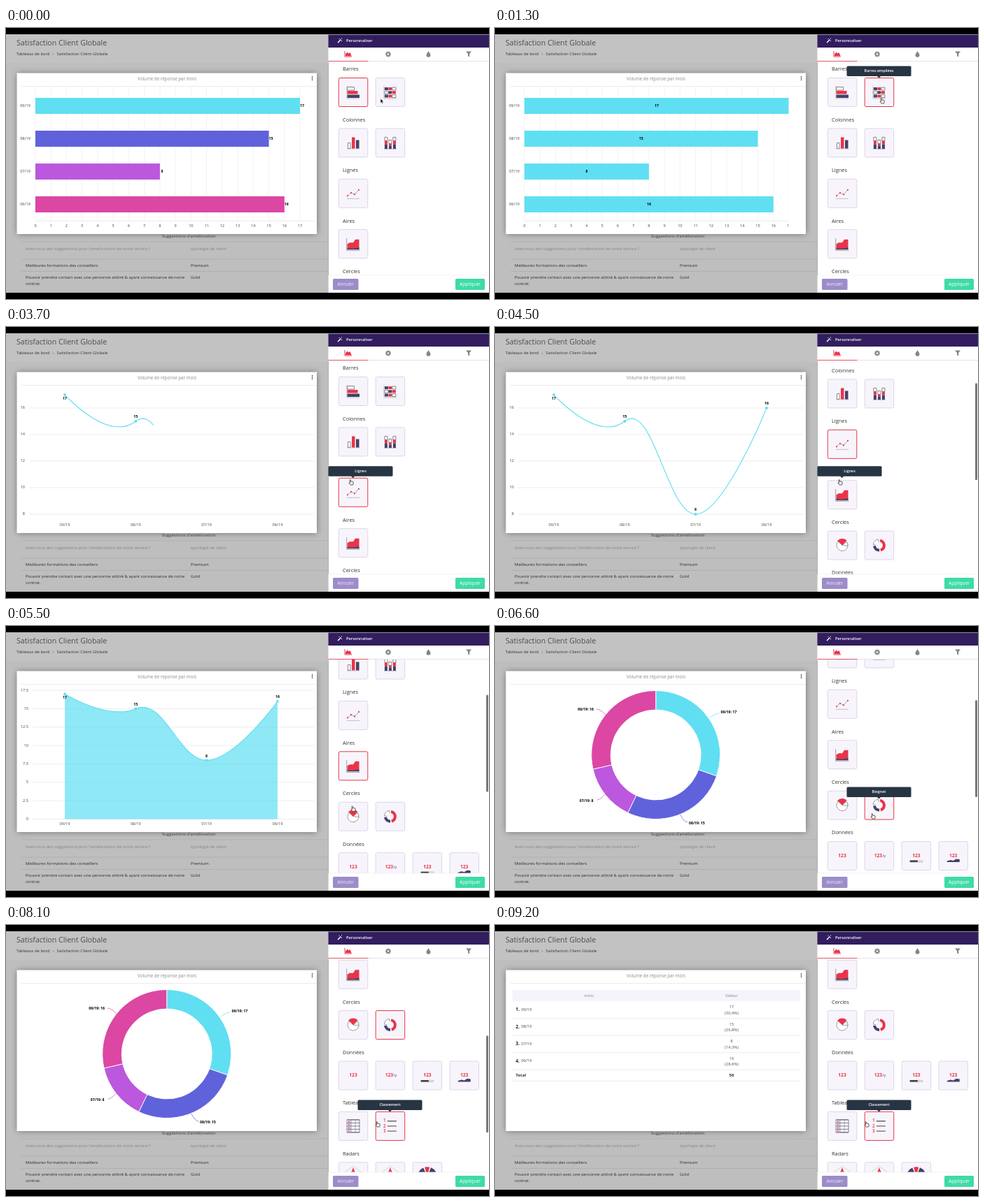
An HTML page with a canvas that plays this animation: 690 by 388 pixels, repeating every 9.3 s.

```html
<!DOCTYPE html>
<html lang="fr">
<head>
<meta charset="utf-8">
<title>Personnaliser</title>
<style>
  html, body { margin: 0; width: 100%; height: 100%; overflow: hidden; background: #000; }
  canvas { display: block; width: 690px; height: 388px; }
</style>
</head>
<body>
<canvas width="690" height="388"></canvas>
<script>
const ctx = document.querySelector('canvas').getContext('2d');
const LOOP = 9300, STEP = 100;
const CYAN = '#60dff2', BLUE = '#6062dc', PURPLE = '#bb58dd', PINK = '#db47a2';
const RED = '#ea3349', NAVY = '#45416a', GREY = '#858585', TILE = '#f7f5fb';
const COLORS = [CYAN, BLUE, PURPLE, PINK];
const MONTHS = ['09/19', '08/19', '07/19', '06/19'];
const VALUES = [17, 15, 8, 16];
const TOTAL = 56;

// Start time, chart type, selected tile (section, column)
const CHARTS = [
  [0, bars, 0, 0], [600, stacked, 0, 1], [2000, columns, 1, 0], [3600, line, 2, 0],
  [5100, area, 3, 0], [5700, pie, 4, 0], [6100, donut, 4, 1], [8400, ranking, 6, 1]
];
// Start, end, label, section, column
const HOVERS = [
  [200, 1700, 'Barres empilées', 0, 1], [1900, 3000, 'Colonne', 1, 0], [3200, 4700, 'Lignes', 2, 0],
  [4900, 5300, 'Aires', 3, 0], [5600, 5800, 'Camembert', 4, 0], [5900, 7100, 'Beignet', 4, 1],
  [7900, LOOP, 'Classement', 6, 1]
];
const SCROLL = [
  [0, 0], [4200, 0], [4450, 69], [5300, 69], [5550, 113.5], [6300, 113.5], [6500, 125],
  [7100, 125], [7600, 238.5]
];
const POINTER = [
  [0, 535, 101], [100, 535, 101], [400, 553, 104], [1500, 553, 104], [1900, 504, 160], [2700, 504, 160],
  [3300, 493, 222], [4700, 493, 222], [4950, 495, 238], [5300, 495, 238], [5550, 496, 264],
  [5750, 496, 264], [5950, 540, 272], [7500, 540, 272], [7900, 531, 285]
];
const SECTIONS = [
  ['Barres', iconBars, iconStackedBars], ['Colonnes', iconColumns, iconStackedColumns],
  ['Lignes', iconLine], ['Aires', iconArea], ['Cercles', iconPie, iconDonut],
  ['Données', iconNumber, iconRate, iconProgress, iconTrend],
  ['Tableaux', iconTable, iconRanking], ['Radars', iconRadar, iconRadar, iconGauge]
];

const ease = u => u * u * (3 - 2 * u);

function tween(keys, t) {
  const next = keys.findIndex(k => k[0] > t);
  if (next < 0) return keys[keys.length - 1].slice(1);
  const a = keys[next - 1], b = keys[next];
  const u = ease((t - a[0]) / (b[0] - a[0]));
  return a.slice(1).map((v, i) => v + (b[i + 1] - v) * u);
}

function rect(x, y, w, h, fill, stroke, radius = 0) {
  ctx.beginPath();
  ctx.roundRect(x, y, w, h, radius);
  paint(fill, stroke);
}

function paint(fill, stroke, width = 1) {
  if (fill) { ctx.fillStyle = fill; ctx.fill(); }
  if (stroke) { ctx.strokeStyle = stroke; ctx.lineWidth = width; ctx.stroke(); }
}

function poly(points, fill, stroke, width) {
  ctx.beginPath();
  for (let i = 0; i < points.length; i += 2) ctx.lineTo(points[i], points[i + 1]);
  if (fill) ctx.closePath();
  paint(fill, stroke, width);
}

function disc(x, y, r, fill, stroke, width) {
  ctx.beginPath();
  ctx.arc(x, y, r, 0, 7);
  paint(fill, stroke, width);
}

function text(s, x, y, size, color, align = 'left', weight = 400) {
  ctx.font = `${weight} ${size}px "Open Sans", sans-serif`;
  ctx.textAlign = align;
  ctx.textBaseline = 'middle';
  ctx.fillStyle = color;
  ctx.fillText(s, x, y);
}

const label = (s, x, y, align = 'center') => text(s, x, y, 5.6, '#444', align);
const valueLabel = (s, x, y, align = 'center') => text(s, x, y, 5.2, '#000', align, 700);

function clipped(x, y, w, h, draw) {
  ctx.save();
  ctx.beginPath();
  ctx.rect(x, y, w, h);
  ctx.clip();
  draw();
  ctx.restore();
}

// Charts: u is the progress of the entry animation

const UNIT = 378 / 17;

function horizontal(u, each) {
  for (let i = 0; i <= 17; i++) {
    const x = 42 + i * UNIT;
    poly([x, 84, x, 276], null, '#ececec', .7);
    label(i, x, 283.5);
  }
  poly([42, 276.5, 440, 276.5], null, '#e4e4e4', .7);
  VALUES.forEach((v, i) => {
    const y = 111.5 + 47 * i;
    label(MONTHS[i], 35, y, 'right');
    each(v, y, v * UNIT * u, i);
  });
}

function bars(u) {
  horizontal(u, (v, y, w, i) => {
    rect(42, y - 11.5, w, 23, COLORS[i]);
    valueLabel(v, 45 + w, y);
  });
}

function stacked(u) {
  clipped(16, 84, 403.5, 211, () => horizontal(u, (v, y, w) => {
    rect(42, y - 11.5, w, 23, CYAN);
    valueLabel(v, 42 + w / 2, y);
  }));
}

function rows(first, step, count, y0, dy, left) {
  for (let i = 0; i < count; i++) {
    const y = y0 - dy * i;
    poly([left + 6, y, 440, y], null, '#e6e6e6', .7);
    label(first + step * i, left, y, 'right');
  }
}

function columns(u) {
  rows(0, 2.5, 8, 276.5, 26.35, 32);
  VALUES.forEach((v, i) => {
    const x = 88.5 + 100.3 * i, h = v * 10.54 * u;
    clipped(16, 84, 380, 192.5, () => rect(x - 24, 276.5 - h, 48, h, COLORS[i]));
    valueLabel(v, x, 271 - h);
    label(MONTHS[i], x, 284);
  });
}

function spline(yOf, u, fill) {
  const x = i => 84 + 101.3 * i;
  const y = VALUES.map(yOf), slope = 1.8 * (yOf(0) - yOf(1));
  clipped(16, 84, 68 + 360 * u, 193, () => {
    ctx.beginPath();
    ctx.moveTo(x(0), y[0]);
    ctx.bezierCurveTo(x(0), y[0], x(.6), y[1] + slope * .9, x(1), y[1]);
    ctx.bezierCurveTo(x(1.4), y[1] - slope * .9, x(1.6), y[2], x(2), y[2]);
    ctx.bezierCurveTo(x(2.4), y[2], x(3), y[3], x(3), y[3]);
    paint(null, CYAN, 1.1);
    if (fill) {
      ctx.lineTo(x(3), 276.5);
      ctx.lineTo(x(0), 276.5);
      paint(fill);
    }
    VALUES.forEach((v, i) => disc(x(i), y[i], 1.9, CYAN));
  });
  VALUES.forEach((v, i) => {
    if (u > i / 4) valueLabel(v, x(i), y[i] + (i ? -6 : 5.5));
    label(MONTHS[i], x(i), 284);
  });
}

function line(u) {
  rows(8, 2, 5, 268, 38, 27);
  spline(v => 420 - 19 * v, u);
}

function area(u) {
  rows(0, 2.5, 8, 276.5, 26.35, 32);
  spline(v => 276.5 - 10.54 * v, u, 'rgba(96,223,242,.7)');
}

function ring(u, inner) {
  const cx = 229.7, cy = 184.5, R = 92;
  let from = -Math.PI / 2;
  VALUES.forEach((v, i) => {
    const to = from + v / TOTAL * Math.PI * 2 * u;
    ctx.beginPath();
    ctx.arc(cx, cy, R, from, to);
    ctx.arc(cx, cy, inner, to, from, true);
    ctx.closePath();
    paint(COLORS[i], '#fff', .9);
    from = to;
  });
  if (u < 1) return;
  const marks = [[307, 131, 320, 125, 322.5, 124], [264.5, 270, 275, 281, 277, 283],
    [157, 241, 146, 249, 140.5, 251], [158, 127, 145, 119, 141, 119.5]];
  marks.forEach(([x1, y1, x2, y2, x, y], i) => {
    ctx.beginPath();
    ctx.moveTo(x1, y1);
    ctx.quadraticCurveTo(x2 - (x2 - x1) * .4, y2, x2, y2);
    paint(null, COLORS[i], .7);
    valueLabel(`${MONTHS[i]}: ${VALUES[i]}`, x, y, i < 2 ? 'left' : 'right');
  });
}

function pie(u) { ring(u, 0); }
function donut(u) { ring(u, 64.5); }

function ranking() {
  rect(25, 93, 411, 16, '#f5f3fb');
  text('mois', 134, 101, 6, GREY, 'center');
  text('Valeur', 338, 101, 6, GREY, 'center');
  VALUES.forEach((v, i) => {
    const y = 121.5 + 24.5 * i;
    text(`${i + 1}.`, 29.5, y, 6.6, '#222', 'left', 700);
    label(MONTHS[i], 37.5, y, 'left');
    text(v, 338, y - 4, 5.9, '#555', 'center');
    text(`(${(v / TOTAL * 100).toFixed(1).replace('.', ',')}%)`, 338, y + 4.5, 5.9, '#555', 'center');
    poly([25, y + 12.2, 436, y + 12.2], null, '#e6e6e6', .7);
  });
  text('Total', 29.5, 215, 6, '#333', 'left', 700);
  text(TOTAL, 338, 215, 6, '#333', 'center', 700);
  poly([25, 223.5, 436, 223.5], null, '#e6e6e6', .7);
}

// Tile icons, drawn around the tile centre

const axes = () => poly([-9, -9, -9, 9, 9, 9], null, '#aaa', .7);

function iconBars() {
  axes();
  rect(-8.5, -7.5, 10, 4.5, '#fff', GREY);
  rect(-8.5, -2, 15, 4.5, RED);
  rect(-8.5, 3.5, 17.5, 4.5, NAVY);
}

function iconStackedBars() {
  axes();
  const cells = [[NAVY, RED, '#fff'], ['#fff', NAVY, RED], [NAVY, RED, '#fff']];
  cells.forEach((row, j) => row.forEach((c, i) =>
    rect(-8 + 5.5 * i, -7 + 5.3 * j, 5, 4, c, c === '#fff' && GREY)));
}

function iconColumns() {
  poly([-9, 8.5, 9, 8.5], null, '#aaa', .7);
  rect(-7.5, 0, 3.5, 8, '#fff', GREY);
  rect(-2, -8, 4.5, 16, RED);
  rect(4, -4, 4.5, 12, NAVY);
}

function iconStackedColumns() {
  poly([-9, 9, 9, 9], null, '#aaa', .7);
  [-8, -2, 4].forEach((x, i) => {
    rect(x, i === 1 ? -4 : -8, 4, 5, '#fff', GREY);
    rect(x, i === 1 ? 1 : -3, 4, i === 1 ? 3 : 5, RED);
    rect(x, i === 1 ? 4 : 2, 4, i === 1 ? 4.5 : 6.5, NAVY);
  });
}

function iconLine() {
  poly([-9, 7.5, 9, 7.5], null, '#aaa', .7);
  const points = [-8, 3.5, -3, -1, 2, 1.5, 8, -5];
  poly(points, null, GREY, .7);
  for (let i = 0; i < 8; i += 2) disc(points[i], points[i + 1], 1.1, RED);
}

function iconArea() {
  poly([-8.5, 7, -8.5, 0, -5, -2, 0, -2, 3, -6.5, 8.5, -6.5, 8.5, 7], RED);
  poly([-8.5, 8, -8.5, 6, 0, 6.5, 8.5, 5, 8.5, 8], NAVY);
  poly([-9.3, -8, -9.3, 9, 9.5, 9], null, GREY, .8);
}

function slice(r, from, to, color, stroke) {
  ctx.beginPath();
  ctx.moveTo(0, 0);
  ctx.arc(0, 0, r, from, to);
  ctx.closePath();
  paint(color, stroke, .8);
}

function iconPie() {
  slice(8, -.6, 4, '#fff', GREY);
  slice(9.5, -2.4, -.8, RED);
  slice(8, -.7, .1, '#fff', GREY);
}

function iconDonut() {
  slice(9, -1.4, 1.3, RED);
  slice(9, 1.55, 3, NAVY);
  slice(8.7, 3.25, 4.55, '#fff', GREY);
  disc(0, 0, 5, TILE);
}

const number = (s, y) => text(s, 0, y, 6.6, RED, 'center', 700);

function iconNumber() { number('123', 0); }

function iconRate() {
  text('123', -1.5, 0, 6.6, RED, 'center', 700);
  text('/y', 4.5, .5, 5.6, NAVY);
}

function iconProgress() {
  number('123', 0);
  rect(-9, 7, 18, 2, '#fff', '#bbb');
  rect(-9, 6.5, 11, 2.5, '#444');
}

function iconTrend() {
  number('123', 0);
  poly([-9, 9, -9, 7.5, -4, 6, 0, 7, 4, 4.5, 9, 5, 9, 9], NAVY);
}

function iconTable() {
  rect(-9, -9, 18, 18, '#fff', GREY);
  rect(-9, -9, 6, 18, '#ddd9e8');
  for (let y = -9; y <= 9; y += 4.5) poly([-9, y, 9, y], null, NAVY, .7);
  [-3, 3].forEach(x => poly([x, -9, x, 9], null, GREY, .7));
  for (let y = -6.7; y < 8; y += 4.5) rect(-7.5, y - .5, 2.5, 1, RED);
}

function iconRanking() {
  [1, 2, 3].forEach(n => {
    const y = (n - 2) * 7.2;
    text(n, -8, y, 6.4, RED, 'center', 600);
    poly([-4, y, 9, y], null, '#666', 1.4);
  });
}

function iconRadar() {
  poly([0, -15, 12, -6, 8, 9, -8, 9, -12, -6, 0, -15], null, '#bbb', .6);
  poly([0, -13, 6, 2, -6, 2], RED);
  poly([0, -8, 3, 0, -3, 0], TILE);
}

function iconGauge() {
  slice(14, 3, 4.3, NAVY);
  slice(14, 4.45, 4.95, RED);
  slice(14, 5.1, 6.4, NAVY);
  disc(0, 0, 6, TILE);
}

// Scene

const tileX = col => 475.3 + 52.9 * col;
const tileY = (section, scroll) => 71.5 + 72.4 * section - scroll;

function page() {
  rect(0, 0, 690, 388, '#000');
  rect(0, 9, 460.5, 370, '#bebebe');
  rect(0, 9, 460.5, 41, '#c2c2c2');
  text('Satisfaction Client Globale', 15, 22.5, 10.65, '#4d4d4d');
  text('Tableaux de bord', 15, 37.5, 5.9, '#333');
  text('›', 66.5, 37, 5.9, '#555');
  text('Satisfaction Client Globale', 72.5, 37.5, 6, '#333');
  const body = (s, x, y, color = '#2c2c2c') => text(s, x, y, 5.98, color);
  text("Suggestions d'amélioration", 261, 298, 6.1, '#444', 'center');
  body("Avez-vous des suggestions pour l'amélioration de notre service ?", 28, 316.5, '#858585');
  body('typologie de client', 264, 316.5, '#858585');
  body('Meilleures formations des conseillers', 28, 340);
  body('Premium', 264, 340);
  body('Pouvoir prendre contact avec une personne attitré & ayant connaissance de notre', 28, 357);
  body('contrat.', 28, 366.5);
  body('Gold', 264, 357);
  [306, 331, 348.5].forEach(y => poly([22, y, 460, y], null, '#adadad', .8));
}

function card(t) {
  ctx.save();
  ctx.shadowColor = 'rgba(0,0,0,.45)';
  ctx.shadowBlur = 9;
  rect(15.5, 64.5, 428.5, 230.5, '#fff');
  ctx.restore();
  text('Volume de réponse par mois', 230, 73.5, 6.25, '#8a8a8a', 'center');
  poly([22, 83.5, 444, 83.5], null, '#e8e8e8', .8);
  [69.8, 72, 74.2].forEach(y => disc(437.5, y, .75, '#222'));
  const [start, draw] = CHARTS.findLast(c => c[0] <= t);
  draw(start ? ease(Math.min(1, (t - start + STEP) / 500)) : 1);
}

function tiles(t, scroll) {
  const chart = CHARTS.findLast(c => c[0] <= t);
  const hover = HOVERS.find(h => t >= h[0] && t < h[1]);
  const matches = (entry, s, c) => entry && entry.at(-2) === s && entry.at(-1) === c;
  SECTIONS.forEach(([name, ...icons], s) => {
    const y = tileY(s, scroll);
    text(name, 481, y - 12, 7.4, '#333');
    icons.forEach((icon, c) => {
      const x = tileX(c);
      const active = matches(chart, s, c) || matches(hover, s, c);
      if (!active) ctx.setLineDash([1.5, 1]);
      rect(x, y, 41.5, 41, TILE, active ? RED : '#c5bddc', 2);
      ctx.setLineDash([]);
      ctx.save();
      ctx.translate(x + 20.7, y + 20.5);
      icon();
      ctx.restore();
    });
  });
}

function panel(t, scroll) {
  rect(460.5, 9, 229.5, 370, '#fff');
  clipped(460.5, 48, 229.5, 306, () => tiles(t, scroll));
  const scrolling = (t >= 4200 && t < 5000) || (t >= 5300 && t < 6900) || (t >= 7100 && t < 8500);
  if (scrolling) rect(686, 48.5 + scroll * .46, 3, 139, '#777', null, 1.5);

  rect(460.5, 9.5, 229.5, 18.5, '#321d5f');
  poly([474, 21, 478.5, 16.5], null, '#fff', 1.4);
  [[476, 15.5], [479.5, 15], [479.5, 18.5]].forEach(([x, y]) => rect(x - .5, y - .5, 1, 1, '#fff'));
  text('Personnaliser', 486, 18.3, 5.7, '#fff', 'left', 600);

  rect(460.5, 28, 229.5, 19.5, '#fff');
  poly([460.5, 47.5, 690, 47.5], null, '#dcdce4', .8);
  poly([460.5, 47.5, 517.5, 47.5], null, RED, .8);
  poly([484, 33, 484, 41, 494, 41], null, RED, 1);
  poly([485, 40, 485, 37.5, 487.5, 34.5, 489.5, 36.5, 491.5, 35, 493.5, 40], RED);
  for (let i = 0; i < 4; i++) {
    const a = i * Math.PI / 4, dx = Math.cos(a) * 4, dy = Math.sin(a) * 4;
    poly([546 - dx, 37.5 - dy, 546 + dx, 37.5 + dy], null, GREY, 1.7);
  }
  disc(546, 37.5, 2.1, '#fff', GREY, 1.6);
  ctx.beginPath();
  ctx.moveTo(603.5, 33);
  ctx.bezierCurveTo(605, 36, 606.5, 37, 606.5, 38.7);
  ctx.arc(603.5, 38.7, 3, 0, Math.PI);
  ctx.bezierCurveTo(600.5, 37, 602, 36, 603.5, 33);
  paint(GREY);
  poly([657, 33.5, 665, 33.5, 662.2, 37, 662.2, 41.5, 660, 40, 660, 37], GREY);

  rect(460.5, 354, 229.5, 25, '#fff');
  poly([460.5, 354, 690, 354], null, '#ececf0', .7);
  rect(467, 359, 36.5, 16, '#9c8cc9', null, 1.5);
  text('Annuler', 485.2, 367, 6.4, '#f1edff', 'center');
  rect(642, 359, 42, 16, '#3edba6', null, 1.5);
  text('Appliquer', 663, 367, 6.6, '#fff', 'center');
}

function tooltip(t) {
  const hover = HOVERS.find(h => t >= h[0] && t < h[1]);
  if (!hover) return;
  // The tooltip keeps its place when the list scrolls under it
  const [start, , name, section, col] = hover;
  const y = tileY(section, tween(SCROLL, start)[0]) - 17;
  const center = tileX(col) + 20.3;
  const x = Math.max(460.5, center - 46);
  rect(x, y, 92, 14.5, '#273443', null, 1.5);
  poly([center - 3, y + 14, center + 3, y + 14, center, y + 17], '#273443');
  text(name, x + 46, y + 7.4, 5.4, '#fff', 'center', 600);
}

function pointer(t) {
  const [x, y] = tween(POINTER, t);
  ctx.save();
  ctx.translate(x, y);
  if (t < 200) {
    poly([0, 0, 0, 6.5, 1.5, 5.2, 2.6, 7.5, 3.6, 7, 2.6, 4.8, 4.6, 4.7], '#111', '#fff', .5);
  } else {
    poly([-2, -3, -1, -3.4, 0, -.6, 1, -1, 2, -.5, 3, -.2, 3.2, 2, 2.5, 4, -1, 4, -3, 1.2, -2.5, .6, -1.2, 1.2],
      '#fff', '#333', .8);
  }
  ctx.restore();
}

function frame(now) {
  const t = Math.floor(now % LOOP / STEP) * STEP;
  const [scroll] = tween(SCROLL, t);
  page();
  card(t);
  panel(t, scroll);
  tooltip(t);
  pointer(t);
  requestAnimationFrame(frame);
}
requestAnimationFrame(frame);
</script>
</body>
</html>
```
